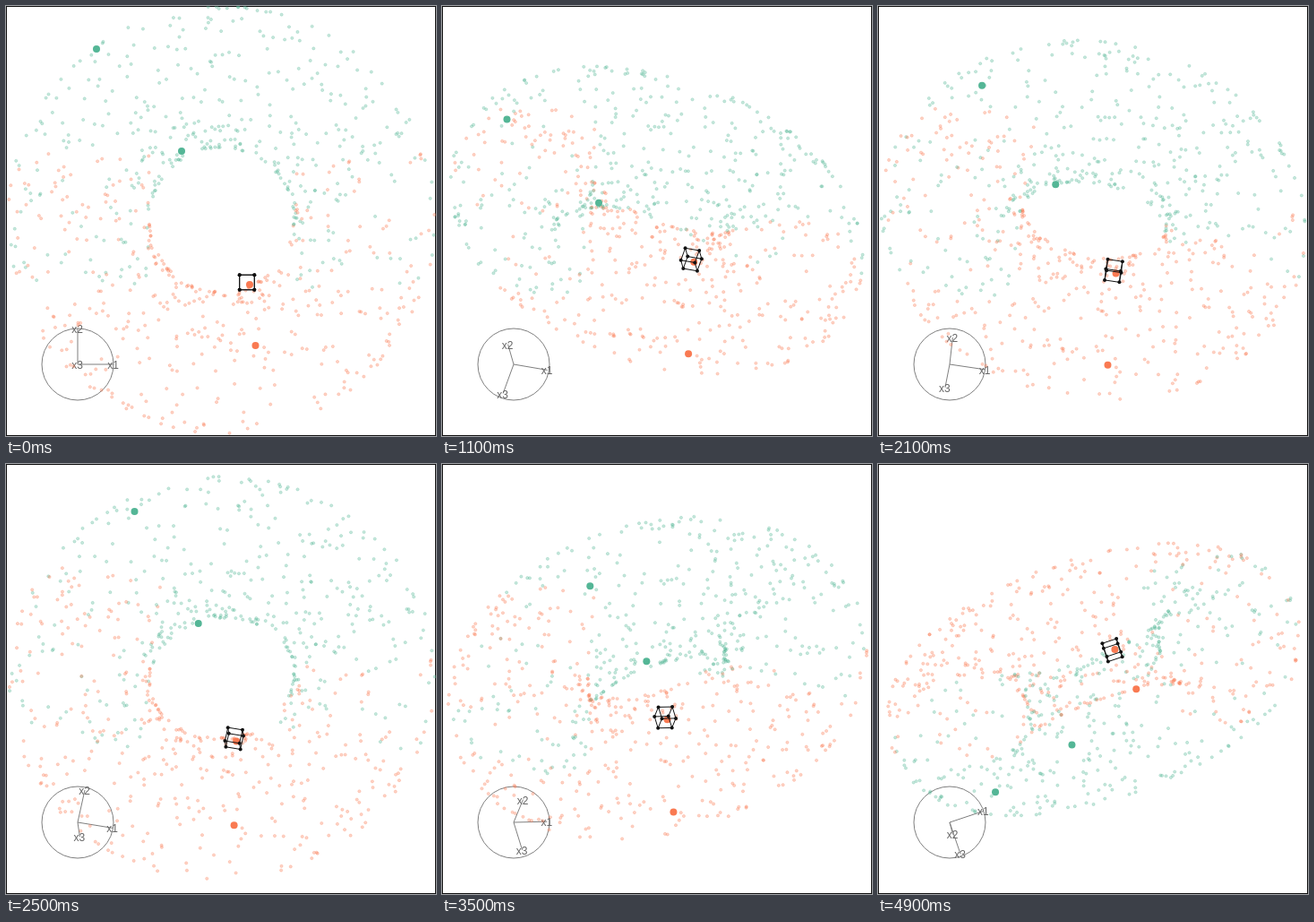
Animation, 480 px wide and 480 px high, one loop 5000 ms. Source, as an HTML page:

```html
<!DOCTYPE html>
<html lang="en">
<head>
<meta charset="utf-8">
<title>Torus tour</title>
<style>
  html, body { margin: 0; width: 100%; height: 100%; overflow: hidden; background: #fff; }
  svg { display: block; width: 100vw; height: 100vh; }
  text { font: 12px "Liberation Sans", Arial, sans-serif; fill: #666; text-anchor: middle; }
  .axis { fill: none; stroke: #7f7f7f; stroke-width: 1; }
  .dots circle { fill-opacity: .32; stroke-opacity: .32; stroke-width: .8; }
  .cube line { stroke: #111; stroke-width: 1; }
  .cube circle { fill: #111; }
</style>
</head>
<body>
<svg id="stage" viewBox="0 0 480 480">
  <rect width="480" height="480" fill="#fff"/>
  <rect x=".5" y=".5" width="479" height="479" fill="none" stroke="#111"/>
  <circle class="axis" cx="80" cy="400" r="40"/>
  <g id="axes"></g>
  <g id="dots" class="dots"></g>
  <g id="marks"></g>
  <g id="cube" class="cube"></g>
</svg>
<script>
const LOOP = 5000, STEP = 100, MID = 240;
const GREEN = '#54b696', ORANGE = '#f97a52';
const RING = 159.5, TUBE = 79, COUNT = 800;

// Viewing direction at chosen steps; the view turns along great circles between them.
const path = [
  [0, [0, 0, 1]],
  [6, [.182, .498, .848]],
  [14, [.331, .911, .231]],
  [17, [.21, .841, .495]],
  [25, [-.134, .387, .914]],
  [27.7, [-.248, .164, .957]],
  [35, [-.356, .729, .59]],
  [42, [-.344, .94, .027]],
  [43, [-.293, .957, -.031]],
  [49, [.024, .934, -.346]]
];

const dot = (u, v) => u[0] * v[0] + u[1] * v[1] + u[2] * v[2];
const cross = (u, v) => [
  u[1] * v[2] - u[2] * v[1],
  u[2] * v[0] - u[0] * v[2],
  u[0] * v[1] - u[1] * v[0]
];
const unit = v => v.map(c => c / Math.hypot(...v));

// Turn v by a share of the shortest rotation from one direction to another.
function turn(v, from, to, share) {
  const k = unit(cross(from, to));
  const angle = Math.acos(dot(from, to)) * share;
  const c = Math.cos(angle), s = Math.sin(angle);
  const side = cross(k, v), along = dot(k, v) * (1 - c);
  return v.map((x, i) => x * c + side[i] * s + k[i] * along);
}

const keys = path.map(([step, dir]) => ({ step, dir: unit(dir) }));
keys[0].basis = [[1, 0, 0], [0, 1, 0]];
for (let i = 1; i < keys.length; i++) {
  const prev = keys[i - 1];
  keys[i].basis = prev.basis.map(v => turn(v, prev.dir, keys[i].dir, 1));
}

function basisAt(step) {
  let i = 0;
  while (i < keys.length - 2 && step >= keys[i + 1].step) i++;
  const from = keys[i], to = keys[i + 1];
  const share = (step - from.step) / (to.step - from.step);
  return from.basis.map(v => turn(v, from.dir, to.dir, share));
}

function add(parent, tag, attrs) {
  const el = document.createElementNS('http://www.w3.org/2000/svg', tag);
  set(el, attrs);
  return document.getElementById(parent).appendChild(el);
}

function set(el, attrs) {
  for (const name in attrs) el.setAttribute(name, attrs[name]);
}

let seed = 20417;
function random() {
  seed = (seed + 0x6D2B79F5) | 0;
  let t = Math.imul(seed ^ (seed >>> 15), 1 | seed);
  t = (t + Math.imul(t ^ (t >>> 7), 61 | t)) ^ t;
  return ((t ^ (t >>> 14)) >>> 0) / 4294967296;
}

// The two classes swap sides of the tube at the left and right of the ring.
function isGreen([x, y, z]) {
  return Math.abs(x) > 80 && Math.abs(y) < 75 ? x * z < 0 : y > 0;
}

const spots = [];
for (let i = 0; i < COUNT; i++) {
  const around = random() * 2 * Math.PI, tube = random() * 2 * Math.PI;
  const reach = RING + TUBE * Math.cos(tube);
  const at = [.5 + reach * Math.cos(around), 1.5 + reach * Math.sin(around), TUBE * Math.sin(tube)];
  const color = isGreen(at) ? GREEN : ORANGE;
  spots.push({ at, el: add('dots', 'circle', { r: 1.6, fill: color, stroke: color }) });
}

const marks = [
  [[-139, 192, 20], GREEN],
  [[-44, 78, 37.5], GREEN],
  [[32, -71, 1], ORANGE],
  [[38.5, -139, 79], ORANGE]
];
for (const [at, fill] of marks) spots.push({ at, el: add('marks', 'circle', { r: 4, fill }) });

const corners = [], edges = [];
const corner = i => [29, -68.5, 0].map((c, d) => c + (i >> d & 1 ? 8.3 : -8.3));
for (let i = 0; i < 8; i++) {
  corners.push(corner(i));
  for (const bit of [1, 2, 4]) {
    if (!(i & bit)) edges.push({ ends: [i, i | bit], el: add('cube', 'line', {}) });
  }
}
for (const at of corners) spots.push({ at, el: add('cube', 'circle', { r: 2 }) });

const axes = [0, 1, 2].map(i => {
  const line = add('axes', 'line', { class: 'axis', x1: 80, y1: 400 });
  const label = add('axes', 'text', {});
  label.textContent = 'x' + (i + 1);
  return { line, label };
});

function draw(time) {
  const [right, up] = basisAt(Math.floor((time % LOOP) / STEP));
  const project = p => [MID + dot(right, p), MID - dot(up, p)];

  for (const { at, el } of spots) {
    const [cx, cy] = project(at);
    set(el, { cx, cy });
  }
  for (const { ends, el } of edges) {
    const [[x1, y1], [x2, y2]] = ends.map(i => project(corners[i]));
    set(el, { x1, y1, x2, y2 });
  }
  axes.forEach(({ line, label }, i) => {
    const x = 80 + 40 * right[i], y = 400 - 40 * up[i];
    set(line, { x2: x, y2: y });
    set(label, { x: x - .5, y: y + 5 });
  });
}

const start = performance.now();
function tick() {
  draw(performance.now() - start);
  requestAnimationFrame(tick);
}
tick();
</script>
</body>
</html>
```
